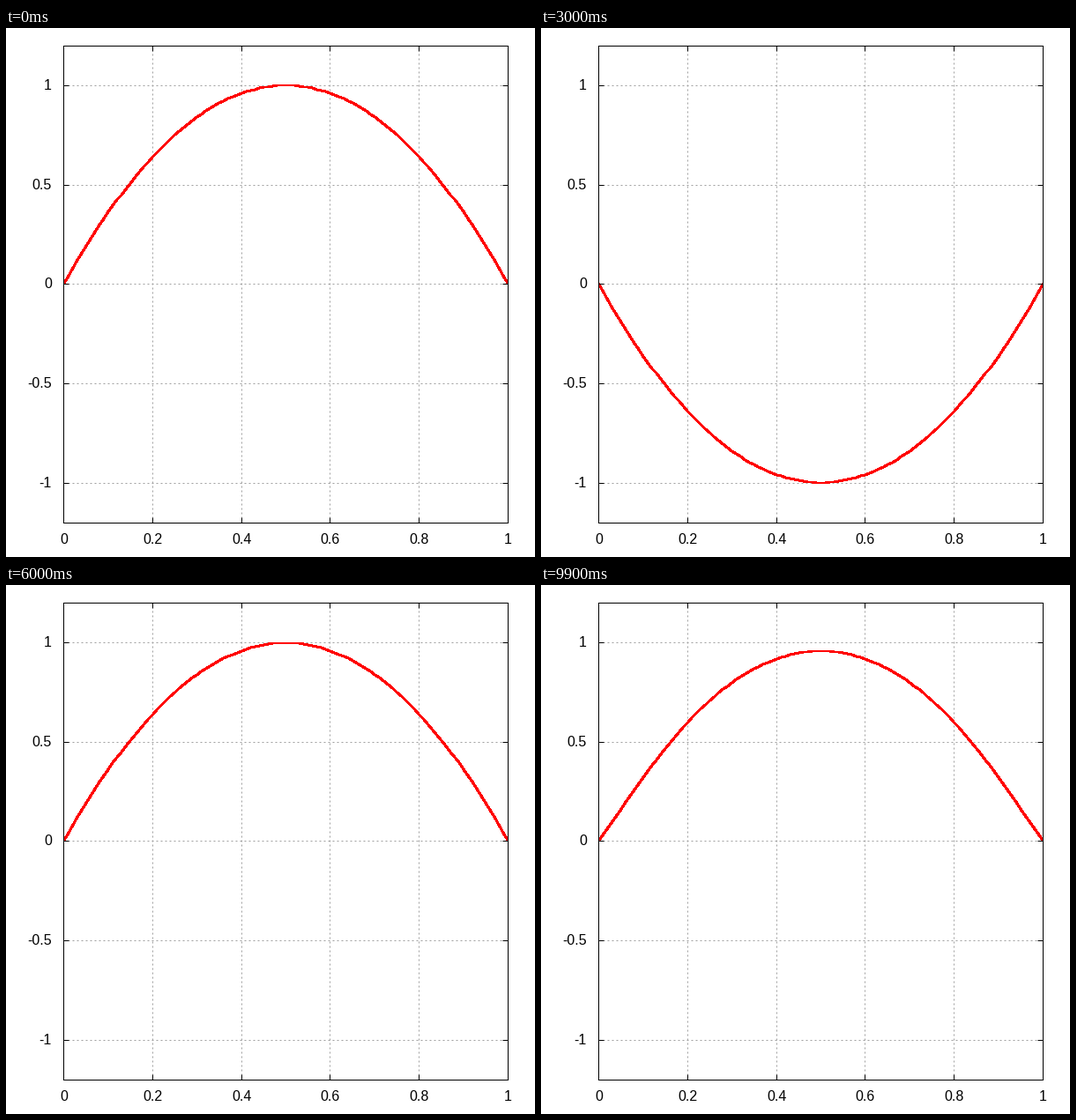
Recreate the animation shown at these times as a matplotlib script. Size 600 by 600 pixels, loop 10 s.

```python
import numpy as np
import matplotlib.pyplot as plt
from matplotlib.animation import FuncAnimation
from matplotlib.patches import Rectangle

SIZE, DPI = 600, 100
PX = 72 / DPI                      # one pixel in points
LEFT, RIGHT, TOP, BOTTOM = 65, 569, 20, 561
TICK = 6
FRAMES, STEP = 100, 0.1            # wave travels STEP string lengths per frame
FADE = 0.0004

plt.rcParams["font.family"] = "Liberation Sans"

fig = plt.figure(figsize=(SIZE / DPI, SIZE / DPI), dpi=DPI, facecolor="white")
ax = fig.add_axes([0, 0, 1, 1])
ax.set_xlim(0, SIZE)
ax.set_ylim(SIZE, 0)
ax.axis("off")


def to_px(x):
    return np.rint(LEFT + (RIGHT - LEFT) * np.asarray(x))


def to_py(y):
    return np.floor(BOTTOM - (BOTTOM - TOP) * (np.asarray(y) + 1.2) / 2.4 + 0.5 - 1e-6)


def line(x0, y0, x1, y1, color="black", z=4, **kw):
    ax.plot([x0 + 0.5, x1 + 0.5], [y0 + 0.5, y1 + 0.5], color=color, lw=PX,
            zorder=z, snap=False, **kw)


def grid(*ends):
    line(*ends, color="#a0a0a0", z=1, linestyle=(0, (2, 3)), dash_capstyle="butt")


def label(x, y, value, align):
    ax.text(x, y, f"{value:g}", fontsize=16 * PX, ha=align, va="baseline")


for v in (0, 0.2, 0.4, 0.6, 0.8, 1):
    x = to_px(v)
    if 0 < v < 1:
        grid(x, BOTTOM, x, TOP)
    line(x, BOTTOM, x, BOTTOM - TICK, solid_capstyle="butt")
    line(x, TOP, x, TOP + TICK, solid_capstyle="butt")
    label(x + 0.5, 585, v, "center")

for v in (-1, -0.5, 0, 0.5, 1):
    y = to_py(v)
    grid(LEFT, y, RIGHT, y)
    line(LEFT, y, LEFT + TICK, y, solid_capstyle="butt")
    line(RIGHT, y, RIGHT - TICK, y, solid_capstyle="butt")
    label(52, y + 5, v, "right")

for ends in ((LEFT, TOP, RIGHT, TOP), (LEFT, BOTTOM, RIGHT, BOTTOM),
             (LEFT, TOP, LEFT, BOTTOM), (RIGHT, TOP, RIGHT, BOTTOM)):
    line(*ends, solid_capstyle="projecting")


def shape(x):
    """Parabolic pluck, extended as an odd function of period 2."""
    x = (x + 1) % 2 - 1
    return 4 * x * (1 - np.abs(x))


xs = np.linspace(0, 1, 101)
string, = ax.plot([], [], color="red", lw=2 * PX, zorder=3, antialiased=False,
                  snap=False, solid_capstyle="butt", solid_joinstyle="round")
string.set_clip_path(Rectangle((LEFT, TOP), RIGHT - LEFT + 1, BOTTOM - TOP + 1,
                               transform=ax.transData))


def update(i):
    t = i * STEP
    u = (shape(xs - t) + shape(xs + t)) / 2 * (1 - FADE * t)
    string.set_data(to_px(xs) + 0.5, to_py(u))
    return string,


anim = FuncAnimation(fig, update, frames=FRAMES, interval=100,
                     repeat=True, repeat_delay=0, blit=False)
plt.show()
```
